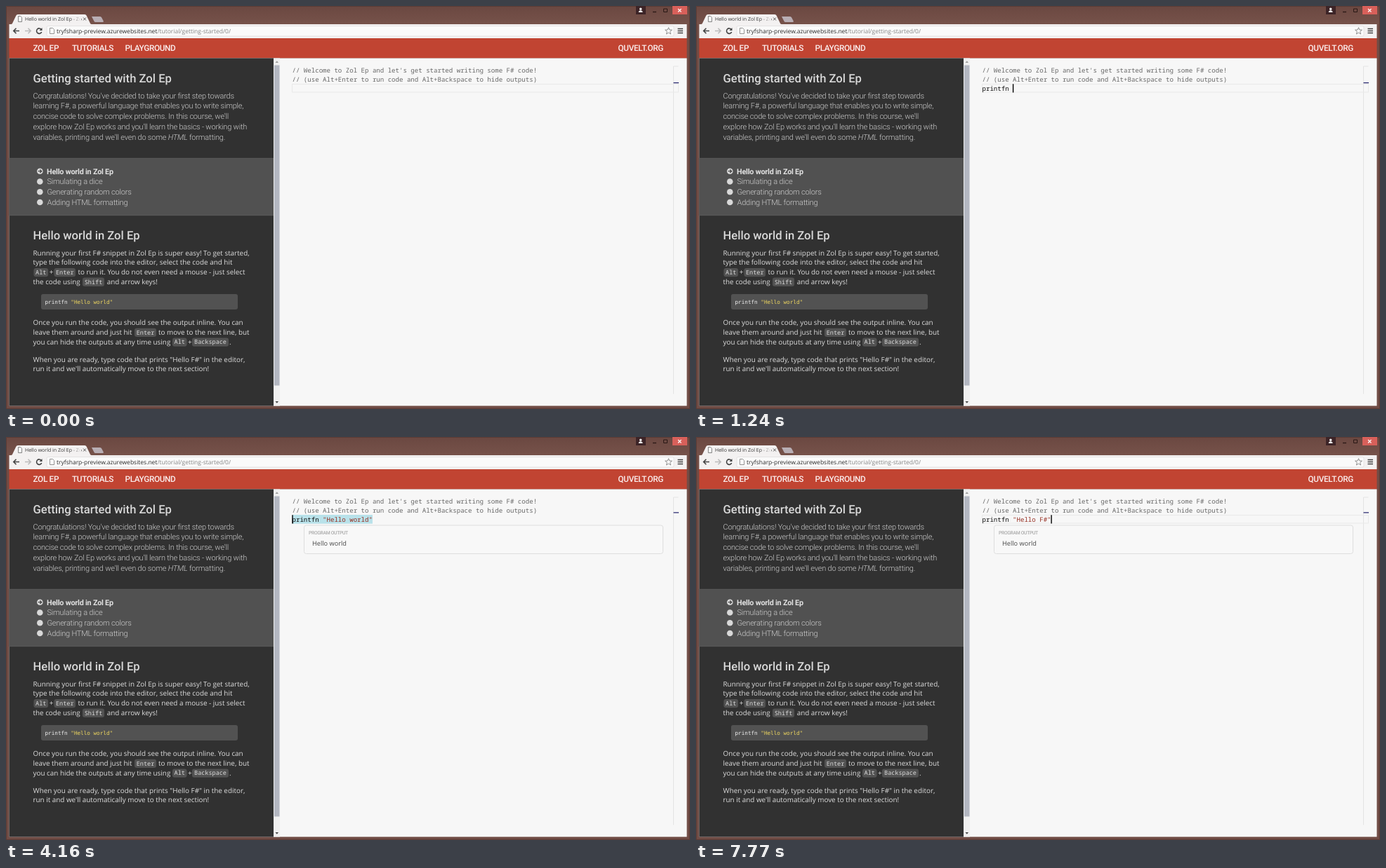
Write an HTML page that moves like this. It is 974 px wide and 575 px high and loops after 8000 ms.

```html
<!DOCTYPE html>
<html lang="en">
<head>
<meta charset="utf-8">
<title>Interactive tutorial</title>
<style>
html, body { margin: 0; width: 100%; height: 100%; overflow: hidden; background: #6e4c45; }
svg { display: block; width: 974px; height: 575px; }
text { white-space: pre; text-rendering: geometricPrecision; }
.nav { font: 500 11.8px Roboto, sans-serif; letter-spacing: -.34px; fill: #fbeeee; }
.head { font: 500 16.6px Roboto, sans-serif; fill: #d8d8d8; }
.lead { font: 300 11px Roboto, sans-serif; letter-spacing: -.21px; fill: #cecece; }
.active { font: 700 10.8px Roboto, sans-serif; letter-spacing: -.22px; fill: #e2e2e2; }
.body { font: 9.9px "Open Sans", sans-serif; fill: #dcdcdc; }
.key { font: 8.5px "Noto Sans Mono", monospace; fill: #dcdcdc; }
.snippet { font: 7.65px "DejaVu Sans Mono", monospace; fill: #f2f2f2; }
.code { font: 9.083px "Noto Sans Mono", monospace; fill: #111; }
.tab { font: 7px "Open Sans", sans-serif; fill: #333; }
.url { font: 8.5px "Open Sans", sans-serif; fill: #2a2a2a; }
.label { font: 500 6.8px Roboto, sans-serif; letter-spacing: -.33px; fill: #a9a9a9; }
.result { font: 9.2px "Open Sans", sans-serif; fill: #484848; }
.item { font: 7px "Noto Sans Mono", monospace; fill: #333; }
.sig { font: 6.13px "Noto Sans Mono", monospace; fill: #1558cc; }
</style>
</head>
<body>
<svg viewBox="0 0 974 575">
  <defs>
    <linearGradient id="fade"><stop stop-color="#f3f1f1" stop-opacity="0"/><stop offset="1" stop-color="#f3f1f1"/></linearGradient>
    <linearGradient id="frame" x2="0" y2="1"><stop stop-color="#6b4841"/><stop offset="1" stop-color="#76524a"/></linearGradient>
  </defs>

  <!-- window frame -->
  <rect width="974" height="575" fill="#704c45"/>
  <rect width="974" height="26" fill="url(#frame)"/>
  <path d="M.5 575V.5H973.5V574.5H.5" fill="none" stroke="#5a3b35"/>
  <path d="M4.5 26H7Q8.500 26 9.200 24.500L14.300 13.700Q15 12 17 12H112Q114 12 114.700 13.700L119.800 24.500Q120.500 26 122 26H969.500V46H4.500Z" fill="#f3f1f1"/>
  <path d="M122 15H134Q135.500 15 136.200 16.500L138.800 21.500Q139.300 23 137.500 23H127.500Q126 23 125.300 21.500L122 15Z" fill="#b8aeb4"/>
  <path d="M17.5 14.5H20.5L22.5 16.5V22.5H17.5Z" fill="#fff" stroke="#666" stroke-width=".8"/>
  <path d="M110 16.5L114 20.5M114 16.5L110 20.5" stroke="#555"/>
  <rect x="897" width="14" height="12" fill="#3c2427"/>
  <circle cx="903.7" cy="4.3" r="1.7" fill="#fff"/><path d="M900.8 9Q901 6.3 903.7 6.3T906.6 9Z" fill="#fff"/>
  <path d="M921 8.5H926" stroke="#2a1815" stroke-width="1.3"/>
  <path d="M936.5 4H941.5V8.5H936.5Z" fill="none" stroke="#2a1815"/>
  <rect x="949" width="21" height="12" fill="#d8605a"/>
  <path d="M957 4L961.500 8.500M961.500 4L957 8.500" stroke="#fff" stroke-width="1.2"/>

  <!-- toolbar -->
  <rect x="58" y="28.500" width="893" height="14.500" rx="2" fill="#fafafa" stroke="#dedcdc" stroke-width=".7"/>
  <g fill="none" stroke="#444" stroke-width="1.6">
    <path d="M19 35.5H11M14.500 31.800L10.800 35.500L14.500 39.200"/>
    <path d="M27 35.5H35M31.500 31.800L35.200 35.500L31.500 39.200" stroke="#bbb"/>
    <path d="M50.300 33.500A3.700 3.700 0 1 0 50.700 37"/>
    <path d="M956.500 32.500H964M956.500 35.500H964M956.500 38.500H964"/>
  </g>
  <path d="M51.500 31V35H47.500Z" fill="#444"/>
  <path d="M62.500 31.500H66.500L68.500 33.500V39.500H62.500Z" fill="#fff" stroke="#777" stroke-width=".8"/>
  <path d="M943.500 30.700L944.900 34L948.400 34.200L945.700 36.500L946.600 40L943.500 38.100L940.400 40L941.300 36.500L938.600 34.200L942.100 34Z" fill="none" stroke="#777" stroke-width=".8"/>

  <!-- page -->
  <rect x="4.500" y="46" width="965" height="28.500" fill="#c14432"/>
  <rect x="4.500" y="74.500" width="965" height="496" fill="#f7f7f7"/>
  <rect x="4.500" y="74.500" width="376.500" height="496" fill="#313131"/>
  <rect x="4.500" y="217" width="376.500" height="82" fill="#515151"/>
  <path d="M4.500 217.300H381M4.500 298.700H381" stroke="#5c5c5c" stroke-width=".7"/>
  <rect x="381" y="74.500" width="9" height="496" fill="#f0f0f0"/>
  <rect x="382" y="84.500" width="7.500" height="457" fill="#b3b7c1"/>
  <path d="M383.500 81L385.800 78.300L388 81Z" fill="#9a9a9a"/>
  <path d="M383.500 564L385.800 566.700L388 564Z" fill="#444"/>
  <path d="M950.500 553.500V86H957.500" fill="none" stroke="#e3e3e3"/>
  <g fill="#d8d8d8">
    <circle cx="48.300" cy="235.700" r="4.300"/><circle cx="48.300" cy="250.500" r="4.300"/>
    <circle cx="48.300" cy="265.300" r="4.300"/><circle cx="48.300" cy="280" r="4.300"/>
  </g>
  <path d="M45.700 235.700H50.500M48.300 233.400L50.700 235.700L48.300 238" fill="none" stroke="#444" stroke-width="1.300"/>
  <rect x="50" y="411" width="280" height="22" rx="3" fill="#525252"/>
  <g id="page"></g>

  <!-- editor -->
  <rect id="lineBox" x="407.500" y="111.500" width="550" height="11.500" fill="none" stroke="#e9e9e9"/>
  <rect id="selection" y="111" height="12.700" fill="#b9e2ea"/>
  <text class="code" x="407.500" y="120.500"><tspan id="call"></tspan><tspan id="str" fill="#962f22"></tspan></text>
  <rect id="mark" x="950.500" width="7.500" height="1.200" fill="#20206a"/>
  <g id="output">
    <rect x="424.500" y="126" width="511" height="40.500" rx="3" fill="#f8f8f8" stroke="#dedede"/>
    <text class="label" x="431" y="139.200">PROGRAM OUTPUT</text>
    <text class="result" x="436" y="154.500">Hello world</text>
  </g>
  <g id="popup"></g>
  <rect id="caret" y="111.300" width="1.400" height="12.200" fill="#000"/>
</svg>
<script>
const $ = id => document.getElementById(id);
const esc = s => s.replace(/&/g, '&amp;').replace(/</g, '&lt;');
const text = (cls, x, y, s, attrs = '') => `<text class="${cls}" x="${x}" y="${y}" ${attrs}>${s}</text>`;
const key = (x, y, w, s) =>
  `<rect x="${x}" y="${y - 9.2}" width="${w}" height="12.4" rx="3" fill="#525252"/>` +
  text('key', x + w / 2, y - .3, s, 'text-anchor="middle"');

const site = 'Zol Ep';
$('page').innerHTML = [
  text('tab', 27, 21.2, `Hello world in ${site} - Zo`),
  '<rect x="92" y="14" width="15" height="10" fill="url(#fade)"/>',
  text('url', 72, 38.7, 'tryfsharp-preview.azurewebsites.net<tspan fill="#858585">/tutorial/getting-started/0/</tspan>'),
  text('nav', 38.5, 64.3, site.toUpperCase()),
  text('nav', 94, 64.3, 'TUTORIALS'),
  text('nav', 169.5, 64.3, 'PLAYGROUND'),
  text('nav', 936, 64.3, 'QUVELT.ORG', 'text-anchor="end"'),
  text('head', 38.5, 109, `Getting started with ${site}`),
  text('lead', 38.5, 131.6, "Congratulations! You've decided to take your first step towards"),
  text('lead', 38.5, 146.3, 'learning F#, a powerful language that enables you to write simple,'),
  text('lead', 38.5, 161, "concise code to solve complex problems. In this course, we'll"),
  text('lead', 38.5, 175.8, `explore how ${site} works and you'll learn the basics - working with`),
  text('lead', 38.5, 190.6, 'variables, printing and we\'ll even do some <tspan font-style="italic">HTML</tspan> formatting.'),
  text('active', 58, 239.5, `Hello world in ${site}`),
  text('lead', 58.5, 254.3, 'Simulating a dice'),
  text('lead', 58.5, 269.1, 'Generating random colors'),
  text('lead', 58.5, 283.8, 'Adding HTML formatting'),
  text('head', 38.5, 333.2, `Hello world in ${site}`),
  text('body', 38.5, 355.6, `Running your first F# snippet in ${site} is super easy! To get started,`),
  text('body', 38.5, 369.4, 'type the following code into the editor, select the code and hit'),
  key(39.5, 383.1, 20.5, 'Alt'), text('body', 61.8, 383.1, '+'), key(68.5, 383.1, 30.5, 'Enter'),
  text('body', 102.5, 383.1, 'to run it. You do not even need a mouse - just select'),
  text('body', 38.5, 396.8, 'the code using'), key(109, 396.8, 31, 'Shift'),
  text('body', 143.7, 396.8, 'and arrow keys!'),
  text('snippet', 55.5, 425, 'printfn <tspan fill="#f0d860">"Hello world"</tspan>'),
  text('body', 38.5, 455.2, 'Once you run the code, you should see the output inline. You can'),
  text('body', 38.5, 468.9, 'leave them around and just hit'), key(183, 468.9, 31, 'Enter'),
  text('body', 217, 468.9, 'to move to the next line, but'),
  text('body', 38.5, 482.6, 'you can hide the outputs at any time using'),
  key(237, 482.6, 20.5, 'Alt'), text('body', 259, 482.6, '+'), key(265, 482.6, 52, 'Backspace'),
  text('body', 318, 482.6, '.'),
  text('body', 38.5, 507.6, 'When you are ready, type code that prints "Hello F#" in the editor,'),
  text('body', 38.5, 521.4, "run it and we'll automatically move to the next section!"),
  text('code', 407.5, 95.3, `// Welcome to ${site} and let's get started writing some F# code!`, 'style="fill:#686868"'),
  text('code', 407.5, 108, '// (use Alt+Enter to run code and Alt+Backspace to hide outputs)', 'style="fill:#686868"')
].join('');

const LEFT = 407.5, ADVANCE = 5.45, ROW = 10.7, LOOP = 8000;
const colX = col => LEFT + col * ADVANCE;

// completion lists: typed prefix length and entries
const lists = {
  prin: [4, 'printf Printf PrintfFormat printfn PrintfModule'],
  print: [5, 'printf Printf PrintfFormat printfn'],
  printf: [6, 'printf Printf PrintfFormat printfn'],
  printfn: [7, 'printfn'],
  F: [1, 'failwith failwithf Failure false finally fixed float float32 floor for fst fun']
};

function icon(name, x, y) {
  if (name === 'Printf') return text('item', x - 3.5, y + 2.5, '{}');
  if (/^[A-Z]/.test(name))
    return `<path d="M${x - 3.5} ${y - 1.5}l2.5-2 2.500 2-2.500 2zM${x + .5} ${y - 1}h3v2h-3zM${x} ${y + 1.500}h3v2h-3z" fill="#d08a2a"/>`;
  return `<path d="M${x - 3} ${y + 3}L${x + 1} ${y - 1}" stroke="#333" stroke-width="1.600"/>` +
    `<path d="M${x + 1.500} ${y - 3}a2 2 0 1 0 1.500 2.500" fill="none" stroke="#333" stroke-width="1.500"/>`;
}

function popupMarkup(col, id) {
  const x = colX(col), top = 124, list = lists[id];
  const names = list ? list[1].split(' ') : [];
  const box = `<rect x="${x}" y="${top}" width="248" height="${(names.length || 1) * ROW - .4}" fill="#f8f8f8" stroke="#c4c4c4" stroke-width=".8"/>`;
  if (!list) return box + text('item', x + 5, top + 8, 'No suggestions.');
  return box + names.map((name, i) => {
    const y = top + i * ROW, n = list[0];
    const row = i ? '' : `<rect x="${x + .5}" y="${y + .5}" width="247" height="${ROW - .7}" fill="#d3e8fb"/>`;
    const sig = !i && /^printfn?$/.test(name)
      ? text('sig', x + 16.6 + name.length * 4.2, y + 8, esc(`val ${name} : format:Printf.TextWriterFormat<'T> -> 'T`)) : '';
    return row + icon(name, x + 6, y + 5.3) +
      text('item', x + 12.3, y + 8.1, `<tspan fill="#0a62b8" font-weight="600">${name.slice(0, n)}</tspan>${name.slice(n)}`) + sig;
  }).join('');
}

// time, text, caret column (-1: hidden), extras
const full = 'printfn "Hello world"';
const steps = [
  [0, '', -1],
  [400, 'p', 1], [520, 'pr', 2], [640, 'pri', 3], [760, 'prin', 4],
  [820, 'prin', 4, { pop: [4, 'prin'] }],
  [880, 'print', 5, { pop: [4, 'prin'] }],
  [940, 'print', 5, { pop: [5, 'print'] }],
  [1000, 'printf', 6, { pop: [5, 'print'] }],
  [1060, 'printf', 6, { pop: [6, 'printf'] }],
  [1120, 'printfn', 7, { pop: [6, 'printf'] }],
  [1180, 'printfn', 7, { pop: [7, 'printfn'] }],
  [1240, 'printfn ', 8], [1500, 'printfn ""', 9], [1760, 'printfn "H"', 10],
  [1960, 'printfn "He"', 11], [2070, 'printfn "Hel"', 12],
  [2180, 'printfn "Hell"', 13], [2280, 'printfn "Hello"', 14],
  [2480, 'printfn "Hello "', 15], [2570, 'printfn "Hello w"', 16], [2660, 'printfn "Hello wo"', 17],
  [2750, 'printfn "Hello wo"', 17, { pop: [17, 'none'] }],
  [2840, 'printfn "Hello wor"', 18], [2930, 'printfn "Hello worl"', 19],
  [3020, 'printfn "Hello world"', 20], [3110, full, 21],
  [3440, full, 0, { sel: 21 }], [4480, full, -1, { sel: 21, from: 0 }],
  [4680, full, 21], [5540, full, 20], [5870, full, -1], [6200, full, 20],
  [6530, full, 15, { sel: 20 }],
  [7260, 'printfn "Hello F"', 16],
  [7460, 'printfn "Hello F"', 16, { pop: [16, 'F'] }],
  [7640, 'printfn "Hello F#"', 17],
  [7770, 'printfn "Hello F#"', 18]
];
const OUTPUT_AT = 4100;
const show = (id, on) => $(id).setAttribute('visibility', on ? 'visible' : 'hidden');
let shown = null;

function render(time) {
  const step = steps.findLast(s => s[0] <= time);
  const hasOutput = time >= OUTPUT_AT;
  const id = step[0] + ':' + hasOutput;
  if (id === shown) return;
  shown = id;

  const [, line, col, { sel, from = col, pop } = {}] = step;
  const quote = line.indexOf('"'), split = quote < 0 ? line.length : quote;
  $('call').textContent = line.slice(0, split);
  $('str').textContent = line.slice(split);
  show('caret', col >= 0);
  $('caret').setAttribute('x', colX(Math.max(col, 0)) - .2);
  show('lineBox', !sel);
  show('selection', sel);
  if (sel) {
    $('selection').setAttribute('x', colX(from));
    $('selection').setAttribute('width', (sel - from) * ADVANCE);
  }
  show('output', hasOutput);
  $('mark').setAttribute('y', hasOutput ? 107.3 : 109);
  $('popup').innerHTML = pop ? popupMarkup(...pop) : '';
}

function tick() {
  render(performance.now() % LOOP);
  requestAnimationFrame(tick);
}
tick();
</script>
</body>
</html>
```
